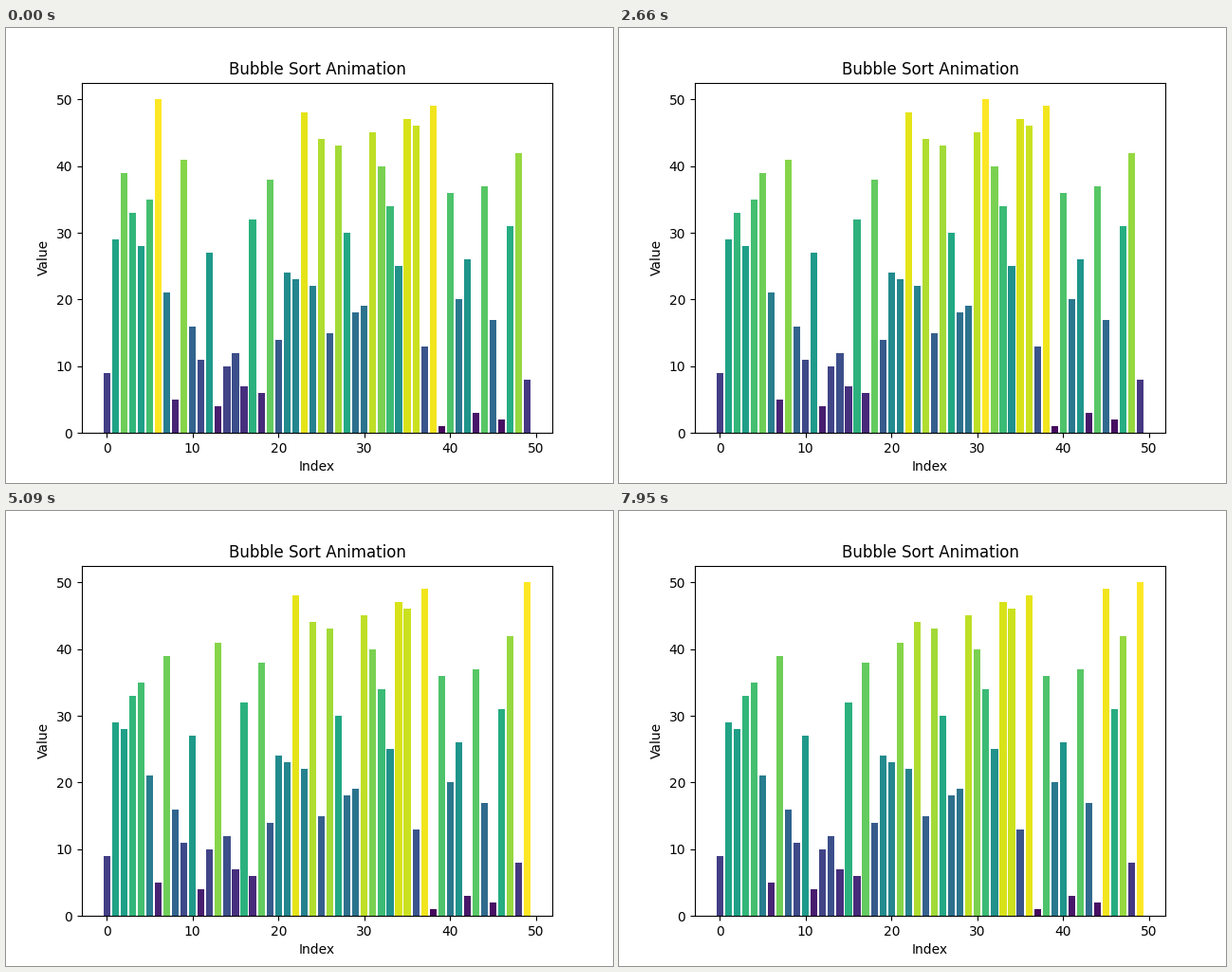
A matplotlib script that plays this animation: 640x480 px, repeating every 8000 ms.

```python
import numpy as np
import matplotlib.pyplot as plt
from matplotlib.animation import FuncAnimation
from matplotlib.collections import PolyCollection

LOOP_MS = 8000
TICK_MS = 10
BAR_WIDTH = 0.8

# The shuffled input; every later state follows from sorting it.
VALUES = [9, 29, 39, 33, 28, 35, 50, 21, 5, 41, 16, 11, 27, 4, 10, 12, 7,
          32, 6, 38, 14, 24, 23, 48, 22, 44, 15, 43, 30, 18, 19, 45, 40, 34,
          25, 47, 46, 13, 49, 1, 36, 20, 26, 3, 37, 17, 2, 31, 42, 8]
COUNT = len(VALUES)
TOP = max(VALUES)


def bubble_sort(values):
    """Yield (swapped, values) after every comparison."""
    a = np.array(values)
    for end in range(len(a) - 1, 0, -1):
        for j in range(end):
            swapped = a[j] > a[j + 1]
            if swapped:
                a[[j, j + 1]] = a[[j + 1, j]]
            yield swapped, a.copy()


def hold_ms(comparisons):
    """A lone step holds 100 ms; idle comparisons run together at 60 per second."""
    return 100 if comparisons == 1 else comparisons * 100 // 60 * 10


def build_schedule():
    """List the distinct states and the time at which each one appears."""
    states, starts = [np.array(VALUES)], [0]
    comparisons = 0
    for swapped, state in bubble_sort(VALUES):
        if swapped:
            begin = starts[-1] + hold_ms(comparisons)
            if begin >= LOOP_MS:
                break
            states.append(state)
            starts.append(begin)
            comparisons = 0
        comparisons += 1
    return states, starts


def bar_corners(heights):
    left = np.arange(COUNT) - BAR_WIDTH / 2
    right = left + BAR_WIDTH
    base = np.zeros(COUNT)
    x = np.column_stack([left, right, right, left])
    y = np.column_stack([base, base, heights, heights])
    return np.dstack([x, y])


states, starts = build_schedule()

fig, ax = plt.subplots(figsize=(6.4, 4.8), dpi=100)
ax.set(title="Bubble Sort Animation", xlabel="Index", ylabel="Value")
span = COUNT - 1 + BAR_WIDTH
ax.set_xlim(-BAR_WIDTH / 2 - 0.05 * span, -BAR_WIDTH / 2 + 1.05 * span)
ax.set_ylim(0, 1.05 * TOP)

bars = PolyCollection(bar_corners(states[0]), edgecolors="none", linewidths=0)
ax.add_collection(bars, autolim=False)


def update(frame):
    step = np.searchsorted(starts, frame * TICK_MS, side="right") - 1
    heights = states[step]
    bars.set_verts(bar_corners(heights))
    bars.set_facecolor(plt.cm.viridis(heights / TOP))
    return [bars]


anim = FuncAnimation(fig, update, frames=LOOP_MS // TICK_MS, interval=TICK_MS,
                     repeat=True, repeat_delay=0, cache_frame_data=False)
plt.show()
```
